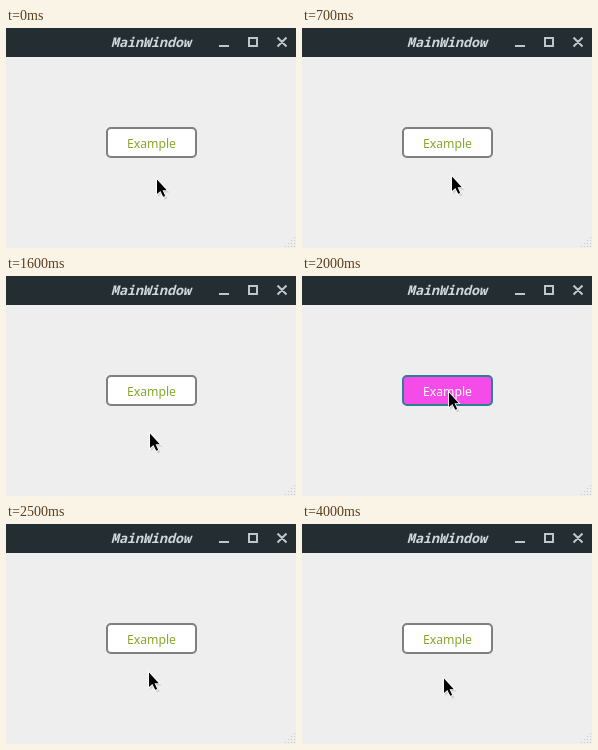
Animation of 290x220 px, one loop 4200 ms. Source, as an HTML page:

```html
<!DOCTYPE html>
<html lang="en">
<head>
<meta charset="utf-8">
<style>
html, body { margin: 0; width: 100%; height: 100%; overflow: hidden; }
svg { display: block; }
.title { font: italic bold 13.33px "Noto Sans Mono", monospace; fill: #cfd8dc; }
.icon { fill: none; stroke: #bcc7cc; stroke-width: 2; }
.button rect { fill: #fff; stroke: #7f7f7f; stroke-width: 2; }
.button text { font: 500 12.2px "Noto Sans", sans-serif; fill: #86a82b; text-anchor: middle; }
.button.hover rect { fill: #f44be9; stroke: #2d7f92; }
.button.hover text { fill: #fff; }
.arrow { stroke: #fff; stroke-width: 1.6; paint-order: stroke; }
</style>
</head>
<body>
<svg width="290" height="220" viewBox="0 0 290 220">
  <rect width="290" height="220" fill="#eee"/>
  <rect width="290" height="29" fill="#232d32"/>
  <text class="title" x="105" y="19">MainWindow</text>
  <path class="icon" d="M213 18h10 M243 10h8v8h-8z M271.5 9.5l9 9 M280.5 9.5l-9 9"/>
  <g id="grip" fill="#c8c8c8"></g>
  <g id="button" class="button">
    <rect x="101" y="100" width="89" height="29" rx="4"/>
    <text x="145.5" y="120">Example</text>
  </g>
  <g id="cursor">
    <path d="M2 2V19L6 15.5L9 21.5L11.5 20.5L9 14.5H13.5Z" opacity=".12"/>
    <path class="arrow" d="M1 1.5V16L4.4 13L7.2 18.8L9.2 17.9L6.6 12.2H10.8Z"/>
  </g>
</svg>
<script>
const LOOP = 4200, STEP = 100;
const REACH = 40, BOW = 4;
const button = document.getElementById("button");
const cursor = document.getElementById("cursor");

// The pointer rests below the button and visits it between rests
const rests = [
  { time: 0, x: 150, y: 150 },
  { time: 600, x: 149, y: 150 },
  { time: 1600, x: 143, y: 156 },
  { time: 2440, x: 141, y: 153 },
  { time: 2900, x: 141, y: 153 }
];

function pointerAt(time) {
  const next = rests.findIndex(rest => rest.time > time);
  if (next < 0) return rests[rests.length - 1];
  const from = rests[next - 1], to = rests[next];
  const progress = (time - from.time) / (to.time - from.time);
  const lift = Math.sin(Math.PI * progress) ** 2;
  return {
    x: Math.round(from.x + (to.x - from.x) * progress + BOW * lift),
    y: Math.round(from.y + (to.y - from.y) * progress - REACH * lift)
  };
}

function drawGrip() {
  let dots = "";
  for (let row = 0; row < 4; row++) {
    for (let col = 0; col <= row; col++) {
      dots += `<rect x="${288 - 3 * col}" y="${209 + 3 * row}" width="1" height="1"/>`;
    }
  }
  document.getElementById("grip").innerHTML = dots;
}

function draw() {
  const time = Math.floor(performance.now() % LOOP / STEP) * STEP;
  const { x, y } = pointerAt(time);
  cursor.setAttribute("transform", `translate(${x} ${y})`);
  button.classList.toggle("hover", y < 130);
  requestAnimationFrame(draw);
}

drawGrip();
draw();
</script>
</body>
</html>
```
